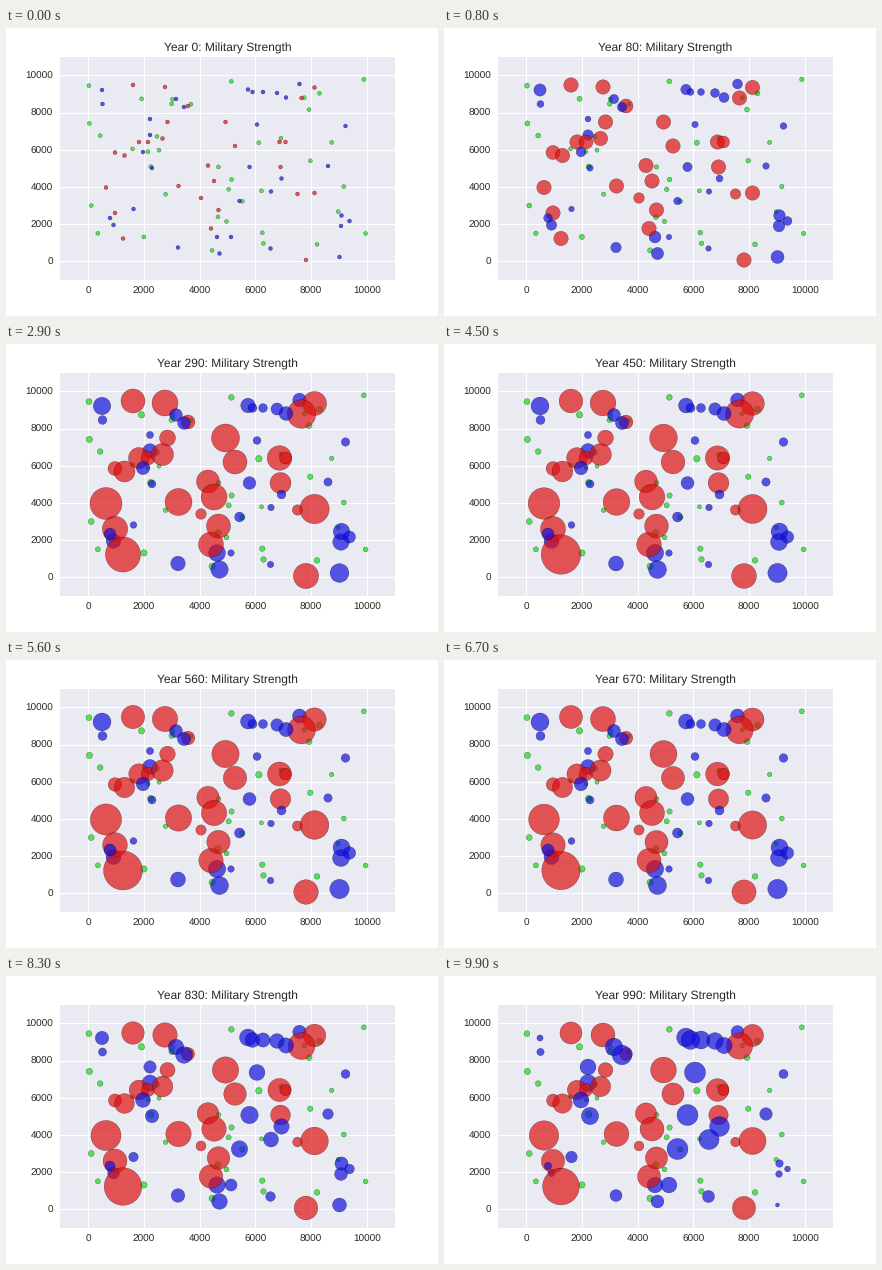
Animation, 432 px wide and 288 px high, one loop 10000 ms. Source, as a matplotlib script:

```python
import numpy as np
import matplotlib.pyplot as plt
from matplotlib.animation import FuncAnimation

plt.rcParams.update({
    "font.family": "Liberation Sans",
    "text.hinting": "none",
    "figure.dpi": 72,
    "savefig.dpi": 72,
    "text.color": "0.15",
    "xtick.color": "0.15",
    "ytick.color": "0.15",
})

FRAMES = 100
START_R = 2.0
rng = np.random.default_rng(7)

# x, y and typical radius of each state, in pixels
RED = np.array([
    (127, 57, 12), (159, 59, 13), (133, 114, 10.5), (142, 114, 7),
    (156.5, 110.5, 11), (161.5, 94, 8), (109, 124.5, 7), (118.5, 127.5, 10.5),
    (100, 159.5, 16), (109, 185, 12.7), (117, 210.5, 20), (172.5, 158, 13.5),
    (182, 78, 7), (195, 170, 5.3), (202, 137.5, 11.5), (208, 153, 13),
    (205, 200.5, 12.5), (212.5, 182, 12), (219.5, 94, 14), (229, 118, 12),
    (273.5, 114, 12.3), (279.5, 114, 6), (274.5, 139, 10.5), (291.5, 166, 5.2),
    (308.5, 165, 14.7), (308.5, 59.5, 12), (295.5, 70, 14.3), (300, 232, 12.6),
])
# The first four lie beneath the red states
BLUE = np.array([
    (107.5, 197, 7.5), (144, 107, 7.5), (211, 209, 8.7), (293.5, 56, 7),
    (96, 62, 9), (96.5, 76, 4.5), (144, 91, 3.6), (137, 124, 6.8),
    (146, 140, 4), (127.5, 181, 3.4), (104, 190, 6), (170, 71, 6.5),
    (178, 79, 6.6), (172, 219.5, 7.5), (213.5, 225.5, 9), (225, 209, 3.3),
    (233.5, 173, 5), (243.5, 139, 6.5), (242, 61.5, 7.5), (246.5, 64, 4.5),
    (257, 64, 4.5), (271, 65, 6.2), (280, 69.5, 7.1), (251, 96.5, 4),
    (275.5, 150.5, 4.5), (265, 163.5, 3.3), (264.5, 220.5, 3.3), (333.5, 229, 9.7),
    (335, 198, 8.5), (335.5, 187.5, 8.5), (343.5, 193, 6.2), (322, 138, 4.2),
    (339.5, 98, 4.3),
])
CENTRE = np.array([220, 125])


def to_data(points):
    return (points[:, 0] - 81.9) / 0.0279, (233.4 - points[:, 1]) / 0.0186


def red_radius(t, size):
    """Expand at a common rate up to the peak, then slowly decline."""
    reach = START_R**2 + 6 * t + 10 * max(t - 16, 0)
    decline = 1 - 0.08 * max(t - 35, 0) / 64
    return np.minimum(np.sqrt(reach), size * decline)


def blue_radius(t, size, distance):
    """Settle early; late on, states near the centre grow and outer ones fade."""
    final = np.clip(15.2 - 0.087 * distance, 2, 10.5)
    settled = START_R + (size - START_R) * (1 - np.exp(-t / 9))
    late = np.clip((t - 67) / 32, 0, 1)
    return np.sqrt(settled**2 + (final**2 - settled**2) * late)


def green_radius(t, size):
    return START_R + (size - START_R) * min(t / 16, 1)


fig = plt.figure(figsize=(6, 4), facecolor="white")
ax = fig.add_axes([0.125, 0.125, 0.775, 0.775], facecolor="#EAEAF2")
ax.set(xlim=(-1000, 11000), ylim=(-1000, 11000))
ax.set_xticks(range(0, 10001, 2000))
ax.set_yticks(range(0, 10001, 2000))
ax.tick_params(length=0, pad=7, labelsize=10)
ax.grid(color="white", lw=1, ls="-")
ax.set_axisbelow(True)
ax.spines[:].set_visible(False)
title = ax.set_title("", fontsize=12, pad=5)


def add_states(x, y, color, radius):
    """Scatter one group; radius maps a time step to the radii."""
    dots = ax.scatter(x, y, c=color, alpha=0.7, edgecolors="black",
                      linewidths=0.3, zorder=3)
    return dots, radius


def add_blue(points):
    size = points[:, 2]
    distance = np.hypot(*(points[:, :2] - CENTRE).T)
    return add_states(*to_data(points), "#1111dd",
                      lambda t: blue_radius(t, size, distance))


green_x, green_y = rng.uniform(0, 10000, (2, 39))
green_size = rng.uniform(2, 3.3, 39)

groups = [
    add_states(green_x, green_y, "#11dd11", lambda t: green_radius(t, green_size)),
    add_blue(BLUE[:4]),
    add_states(*to_data(RED), "#dd1111", lambda t: red_radius(t, RED[:, 2])),
    add_blue(BLUE[4:]),
]


def update(i):
    title.set_text(f"Year {10 * i}: Military Strength")
    for dots, radius in groups:
        dots.set_sizes((2 * radius(i)) ** 2)
    return [title] + [dots for dots, _ in groups]


anim = FuncAnimation(fig, update, frames=FRAMES, interval=100,
                     repeat=True, repeat_delay=0, blit=False)
plt.show()
```
